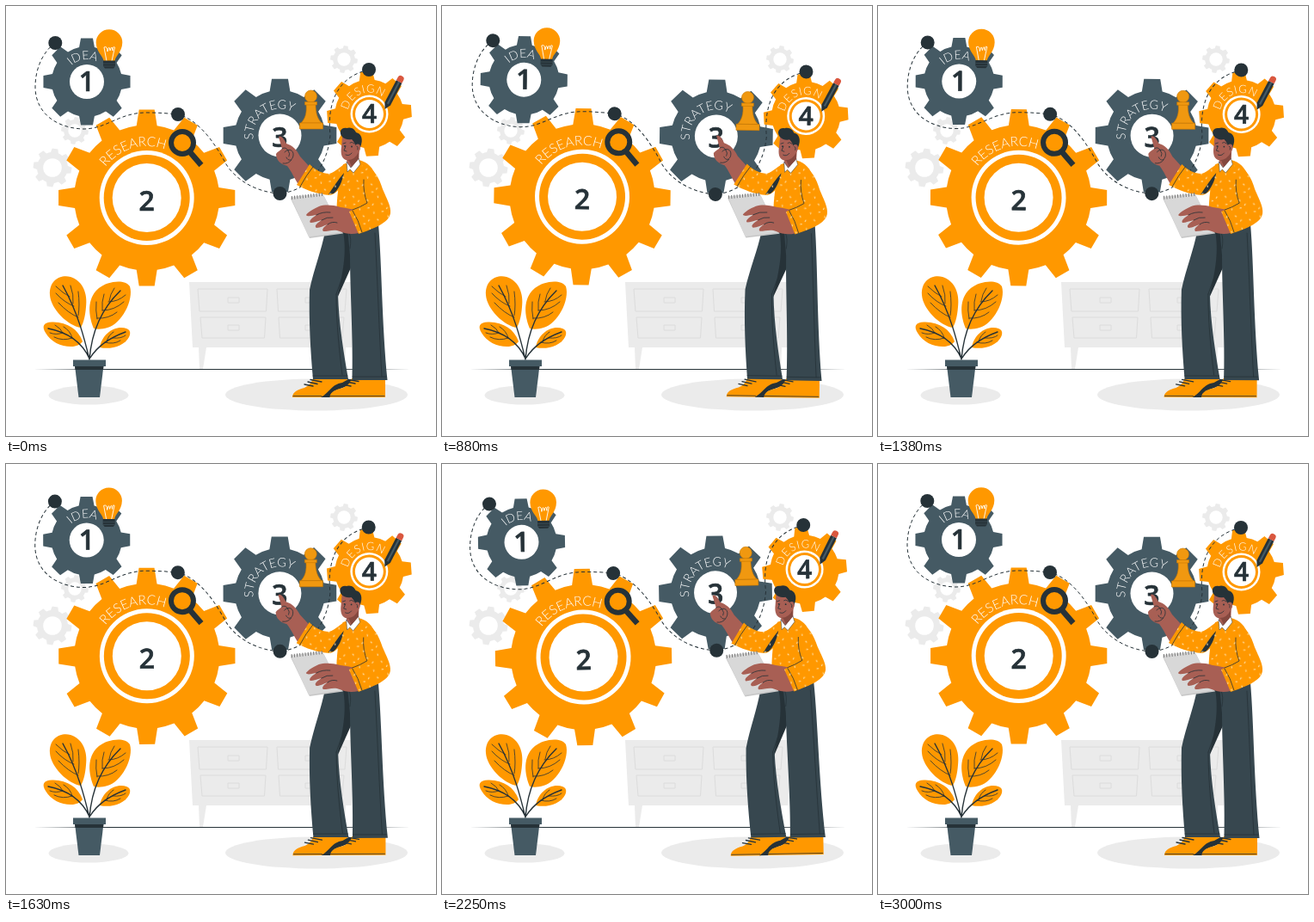
An HTML page that plays this animation: 500x500 px, repeating every 3.04 s.

```html
<!DOCTYPE html>
<html lang="en">
<head>
<meta charset="utf-8">
<title>Process gears</title>
<style>
  html, body { margin: 0; width: 100%; height: 100%; overflow: hidden; background: #fff; }
  svg { display: block; width: 100%; height: 100%; }
  .orange { fill: #ff9800; }
  .slate { fill: #455a64; }
  .dark { fill: #263238; }
  .skin { fill: #a85f54; }
  .pants { fill: #37474f; }
  .pale { fill: #ebebeb; }
  .line { fill: none; stroke: #263238; stroke-width: .8; stroke-linecap: round; stroke-linejoin: round; }
  .stem { stroke-width: 1.4; }
  .label { font-family: Lato, "Open Sans", sans-serif; font-weight: 300; fill: #fff; text-anchor: middle; }
  .digit { font-family: "Open Sans", "Noto Sans", sans-serif; font-weight: 600; fill: #263238;
           stroke: #263238; stroke-width: .7; stroke-linejoin: round; text-anchor: middle; }
</style>
</head>
<body>
<svg viewBox="0 0 500 500" xmlns="http://www.w3.org/2000/svg">
  <defs>
    <pattern id="flecks" width="17" height="19" patternUnits="userSpaceOnUse" patternTransform="rotate(14)">
      <path d="M3 3l1.2 1M11 6l-.6 1.6M6 12l1.4-.4M14 15l.5 1.4" stroke="#ffe0a8" stroke-width="1.1" stroke-linecap="round"/>
    </pattern>
    <g id="drawers" fill="none" stroke="#dcdcdc" stroke-width="1">
      <path d="M223 329H304L302.500 355H225ZM226 362H302L300.500 386H228Z"/>
      <path d="M258 339h13v6h-13ZM258 371h13v6h-13Z"/>
    </g>
  </defs>

  <g id="background">
    <path class="pale" d="M213 321H406L402 397H217ZM224 397h9L229 422h-4ZM386 397h9L394 422h-4Z"/>
    <use href="#drawers"/>
    <use href="#drawers" transform="translate(619 0) scale(-1 1)"/>
    <g id="paleGears"></g>
    <path class="dark" d="M32 422.500L120 422.100H380L470 422.500L380 422.900H120Z"/>
    <ellipse class="pale" cx="96" cy="452.500" rx="46.500" ry="11"/>
    <ellipse class="pale" cx="361" cy="452" rx="106" ry="18.500"/>
  </g>

  <g id="plant">
    <g class="orange">
      <path d="M87 374C72 372 52 352 51 336C50 318 64 312 75 315C90 320 95 335 93 350C92 362 90 368 87 374Z"/>
      <path d="M102 375C94 355 96 338 108 328C118 320 138 317 144 326C149 342 134 370 118 374C112 376 106 376 102 375Z"/>
      <path d="M89 390C84 376 72 368 55 367.500C44 367 41 372 46 380C52 391 66 397 78 396C84 395 87 393 89 390Z"/>
      <path d="M109 397C111 384 122 374 134 374C144 374 146 379 143 385C138 395 122 400 109 397Z"/>
    </g>
    <path class="line stem" d="M97 411C92 390 84 357 66 325M97 411C99 385 108 355 133 331M97 410C88 390 70 379 49 375M98 409C106 396 120 386 139 379"/>
    <path class="line" d="M84 362Q72 357 61 345M79 349Q68 345 58 334M74 338Q66 334 58 326M84 360Q86 348 84 332M78 346Q79 336 75 325
      M106 364Q104 354 105 344M112 354Q111 344 114 335M106 363Q119 364 129 356M112 354Q126 354 137 344M119 344Q130 344 139 336M120 343Q121 335 126 328
      M77 386Q66 390 56 385M66 380Q58 383 51 380M77 386Q75 378 67 373M66 380Q64 375 57 371
      M115 391Q125 394 133 389M124 386Q134 387 139 383M117 390Q119 383 125 379"/>
    <path class="slate" d="M80 418H113.500L109 455H84.500Z"/>
    <path class="dark" d="M80 418H113.500L113 423H80.500Z"/>
    <path class="slate" d="M78 411.500H116V419H78Z"/>
  </g>

  <g id="machine">
    <g id="gears"></g>
    <path class="line" style="stroke-width:1;stroke-dasharray:4 3;stroke-linecap:butt"
      d="M57 43C42 54 34 74 34 94C34 124 58 142 90 143C118 143 132 123 166 124C178 124 190 125 200 126C226 133 244 162 256 184C270 206 296 217 318.500 218C352 215 374 186 377 150C373 112 386 82 422 74"/>
    <g class="dark">
      <circle cx="57.300" cy="43" r="8"/><circle cx="200" cy="126" r="8"/>
      <circle cx="318.500" cy="218" r="8"/><circle cx="422" cy="74" r="8"/>
    </g>

    <g id="bulb">
      <path class="orange" d="M113.500 64C113 58 105 54 104.700 42.500A15.300 15.300 0 0 1 135.300 42.500C135 54 127 58 126.500 64Z"/>
      <path d="M117 64L114 48Q118 46 118 53Q120 44 121 52Q123 44 124 52Q124 46 126.500 48L123 64" fill="none" stroke="#fff" stroke-width=".9"/>
      <path class="dark" d="M113 63.500H127V70L125 72.500H115L113 70Z"/>
      <path d="M113 67H127M113 70H127" stroke="#455a64" stroke-width=".6"/>
    </g>

    <g id="magnifier" fill="none" stroke="#263238">
      <circle cx="205" cy="159" r="13" stroke-width="6"/>
      <path d="M214 170L227 185" stroke-width="6.500"/>
    </g>

    <g id="pawn" fill="#f09810" stroke="#c97800" stroke-width=".6">
      <path d="M349 114H360C360 124 362 131 367 136H343C348 131 350 124 349 114Z"/>
      <path d="M341.500 136H368.500V143H341.500Z"/>
      <circle cx="354.500" cy="105" r="7"/>
      <path d="M347.500 111.500H361.500V115H347.500Z"/>
    </g>

    <g id="pencil" transform="translate(440.500 120) rotate(27.500)">
      <path class="dark" d="M0 0L-3.700-7V-36H3.700V-7Z"/>
      <path class="slate" d="M-1 -7H1.200V-36H-1Z"/>
      <path d="M-3.700-36V-40Q-3.700-43.500 0-43.500Q3.700-43.500 3.700-40V-36Z" fill="#d9573f"/>
    </g>
  </g>

  <g id="person">
    <path class="orange" d="M333 455C333 449 339 446 347 444C353 441 355 438 357 433H398L392 441L368 455Z"/>
    <path class="dark" d="M366 455C376 450 378 440 391 438L398 434L402 434L399 441L381 448L377 455Z"/>
    <path class="orange" d="M376.500 455C377 448 384 446 392 444C398 441 400 438 402 433H441V455Z"/>
    <path class="line" style="stroke-width:1.300" d="M347 440L357 442M351 437L362 439.500M354 434.500L367 437M391 440L401 442M396 437L406 439M398 434.500L410 436.500"/>
    <path class="line" d="M334 453.500H367M377 453.500H440"/>
    <path class="dark" d="M388 262H404L403 300L385 340Z"/>
    <path class="pants" d="M371 262H392C396 285 393 305 386 335C387 370 393 405 398 434H357C354 400 352 365 353 330C358 306 367 284 371 262Z"/>
    <path class="pants" d="M397 258L433 254C437 300 437 370 443.500 435H402.500C404 390 400 330 400 290Z"/>
    <path class="line" d="M384 335C384 370 388 405 391 429M357 430H397M429 264C432 320 434 380 437 431M403 431H442M384 335L390 318M399 264Q402 270 400 282"/>

    <path id="torso" class="orange" d="M392 184L410 179C420 181 427 188 431 200C435 215 438 240 434 255L400 264L385 262C384 244 384 228 387 208Z"/>
    <path class="skin" d="M317 152C320 150 323 154 326 160C333 162 338 167 342 175L353 187L341 209C336 202 332 192 327 186C319 184 314 179 314 172C316 169 319 168 321 166Z"/>
    <path class="line" d="M321 166Q325 163 328 168M324 170C328 165 335 167 334 174C333 180 328 181 326 176M322 183Q328 184 332 179M328 168Q331 172 329 175"/>
    <path id="sleeve" class="orange" d="M353 184C360 191 368 195 376 195C384 193 389 185 398 182L403 197C393 205 386 218 377 220C362 219 349 214 338 208Z"/>
    <path class="dark" d="M375 219C381 210 387 201 393 194C391 204 387 213 381 218Z"/>
    <path class="line" d="M357 187Q349 197 342 210"/>

    <path d="M331 224L369 219.500L392 264.500L353 270Z" fill="#c7c7c7"/>
    <path d="M331 222L368 218L391 263L352 268.500Z" fill="#d8d8d8"/>
    <path d="M332 223L368 219" stroke="#777" stroke-width="4" stroke-dasharray="1 2.200"/>
    <path class="skin" d="M410 238C402 236 396 235 389 234C379 231 370 231 364 233C357 236 351 240 349 243C351 246 357 243 361 243C355 247 352 250 354 252C358 252 362 250 367 249C361 253 358 256 361 258C366 258 370 255 374 254C369 257 367 260 369 262C375 262 382 259 388 262C395 265 402 266 410 264Z"/>
    <path class="line" d="M361 243Q368 239 377 240M367 249Q373 245 380 246M374 254Q379 250 385 252"/>
    <path id="forearm" class="orange" d="M415 184C428 188 434 200 438 213C443 225 448 233 447 241C445 252 430 258 410 265L399 239C406 236 413 232 418 229C412 215 408 196 415 184Z"/>
    <path class="line" d="M416 202Q415 216 420 229Q412 234 403 237M403 238Q410 249 414 263"/>
    <g id="sweaterFlecks" fill="url(#flecks)"></g>

    <path class="skin" d="M397 174L411 166L410 183L402 192L396 184Z"/>
    <path d="M396 181L401 188L410 177L412 184L404 194L400 190L397 193Z" fill="#fff" stroke="#263238" stroke-width=".5"/>
    <path class="skin" d="M391 152C395 148 407 149 411 156C414 160 412 168 409 172C406 178 400 181 395 179C390 177 389 171 390 164Z"/>
    <path d="M396 179Q405 180 410 170L410 178L402 187L399 180Z" fill="#84483f"/>
    <path class="dark" d="M390 151C387 146 390 141 396 142C402 140 406 144 407 147C413 148 416 155 412 164L408 165C406 161 405 158 402 155C398 156 393 155 390 151Z"/>
    <ellipse class="skin" cx="409" cy="164.500" rx="3" ry="4"/>
    <path class="line" d="M392 160L395 159M400 159Q402 157 405 160M395 163L393 168L396 169M395 173Q399 175 402 171M408 163Q410 164 409 167"/>
    <g class="dark"><circle cx="394" cy="163" r=".9"/><circle cx="402" cy="163.500" r=".9"/></g>
  </g>
</svg>

<script>
const NS = "http://www.w3.org/2000/svg";
const byId = id => document.getElementById(id);
const ORANGE = "#ff9800", SLATE = "#455a64", WHITE = "#fff";

function add(parent, tag, attrs, text) {
  const el = document.createElementNS(NS, tag);
  for (const key in attrs) el.setAttribute(key, attrs[key]);
  if (text) el.textContent = text;
  return parent.appendChild(el);
}

// Toothed outline; tip and base are the tooth widths at its two ends.
function gearPath({ x, y, outer, inner, teeth, tip, base, turn = 0 }) {
  const at = (r, a) => `${(x + r * Math.sin(a)).toFixed(2)} ${(y - r * Math.cos(a)).toFixed(2)}`;
  let d = "";
  for (let i = 0; i < teeth; i++) {
    const a = (i / teeth) * 2 * Math.PI + turn * Math.PI / 180;
    const b = base / 2 / inner, t = tip / 2 / outer;
    d += (i ? `A${inner} ${inner} 0 0 1 ` : "M") + at(inner, a - b)
       + `L${at(outer, a - t)}L${at(outer, a + t)}L${at(inner, a + b)}`;
  }
  return d + `A${inner} ${inner} 0 0 1 ` + d.slice(1, d.indexOf("L")) + "Z";
}

function addGear(g) {
  const root = byId("gears");
  add(root, "path", { d: gearPath(g), fill: g.color });
  g.discs.forEach((r, i) => add(root, "circle", { cx: g.x, cy: g.y, r, fill: i % 2 ? g.color : WHITE }));

  // Circle that starts at the bottom and runs clockwise, so the top is at half its length.
  const r = g.textRadius, id = "arc" + g.digit;
  add(root, "path", { id, fill: "none",
    d: `M${g.x} ${g.y + r}A${r} ${r} 0 0 1 ${g.x} ${g.y - r}A${r} ${r} 0 0 1 ${g.x} ${g.y + r}` });
  const label = add(root, "text", { class: "label", "font-size": g.size, "letter-spacing": g.spacing || 0 });
  add(label, "textPath", { href: "#" + id, startOffset: r * (Math.PI + g.middle * Math.PI / 180) }, g.label);

  add(root, "text", { class: "digit", x: g.x, y: g.baseline, "font-size": g.digitSize }, g.digit);
}

addGear({ x: 94, y: 88, outer: 51, inner: 41, teeth: 8, tip: 14, base: 18, color: SLATE, discs: [20],
  label: "IDEA", textRadius: 26, size: 14, middle: -10, digit: "1", baseline: 99, digitSize: 32 });
addGear({ x: 163.7, y: 223, outer: 103, inner: 84.5, teeth: 12, tip: 18, base: 24, color: ORANGE, discs: [55, 50, 40],
  label: "RESEARCH", textRadius: 60, size: 15.5, middle: -16.5, digit: "2", baseline: 237.5, digitSize: 32 });
addGear({ x: 318.5, y: 150.5, outer: 66.5, inner: 52.5, teeth: 8, tip: 19, base: 24, color: SLATE, discs: [25],
  label: "STRATEGY", textRadius: 31, size: 14.5, middle: -35, digit: "3", baseline: 163.5, digitSize: 32 });
addGear({ x: 422.5, y: 125.5, outer: 49.5, inner: 40, teeth: 8, tip: 14, base: 18, turn: -4, color: ORANGE, discs: [22, 19.5, 16.5],
  label: "DESIGN", textRadius: 25, size: 13, spacing: .8, middle: -21, digit: "4", baseline: 136, digitSize: 30 });

for (const [x, y, outer] of [[393, 62, 16], [54, 188, 22.5], [80, 145, 16]]) {
  const d = gearPath({ x, y, outer, inner: outer * .8, teeth: 8, tip: outer * .3, base: outer * .4, turn: 8 });
  add(byId("paleGears"), "path", { d, class: "pale" });
  add(byId("paleGears"), "circle", { cx: x, cy: y, r: outer * .48, fill: WHITE });
}

for (const id of ["sleeve", "forearm"])
  add(byId("sweaterFlecks"), "path", { d: byId(id).getAttribute("d") });
add(byId("sweaterFlecks"), "path", { d: "M394 199L408 190L416 228L400 236L386 231Z" });

const LOOP = 3040, SWAY = 3000;

// Triangle wave: 0 to 1 degree, down to -1, back to 0.
function swayAngle(ms) {
  const p = Math.min(ms / SWAY, 1);
  return p < .25 ? p * 4 : p < .75 ? 2 - p * 4 : p * 4 - 4;
}

function render(ms) {
  const a = swayAngle(ms).toFixed(4);
  byId("machine").setAttribute("transform", `rotate(${a} 253 176)`);
  byId("person").setAttribute("transform", `rotate(${a} 381.5 298.5)`);
}

let start;
function tick(now) {
  start ??= now;
  render((now - start) % LOOP);
  requestAnimationFrame(tick);
}
render(0);
requestAnimationFrame(tick);
</script>
</body>
</html>
```
